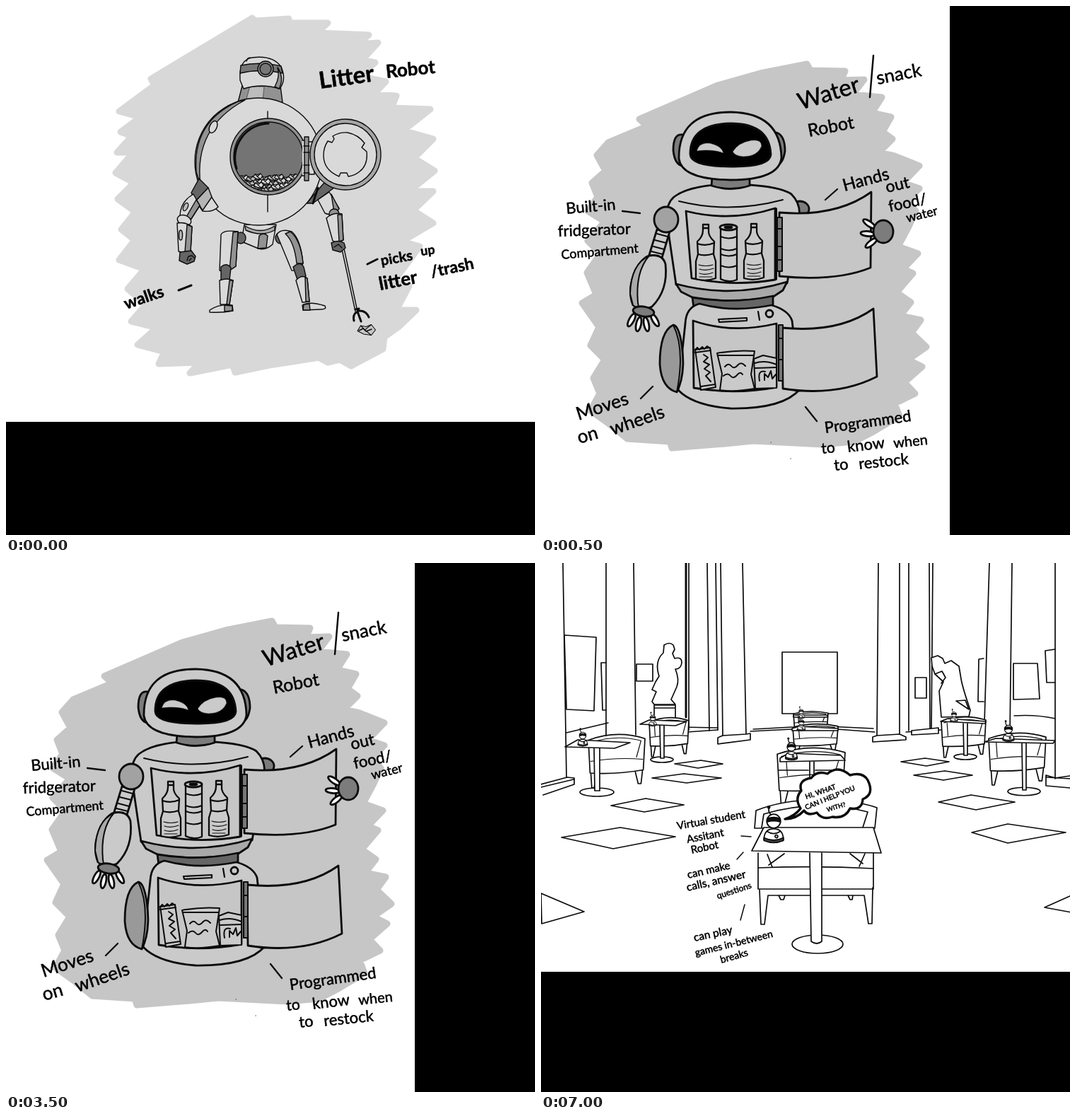
Write an HTML page that moves like this. It is 748 px wide and 748 px high and loops after 8 s.

```html
<!DOCTYPE html>
<html lang="en">
<head>
<meta charset="utf-8">
<title>Robot sketches</title>
<style>
html, body { margin: 0; width: 100%; height: 100%; overflow: hidden; background: #000; }
svg { display: block; width: 100vw; height: 100vh; }
.scene { stroke: #0b0b0b; stroke-linecap: round; stroke-linejoin: round; opacity: 0; }
.scene:first-child { opacity: 1; }
text { font-family: Lato, "Open Sans", sans-serif; fill: #000; stroke: #000; stroke-width: .5; }
</style>
</head>
<body>
<svg id="stage" viewBox="0 0 748 748"></svg>
<script>
const path = (d, fill = 'none', width) =>
  `<path d="${d}" fill="${fill}"${width ? ` stroke-width="${width}"` : ''}/>`;
const poly = (points, fill = 'none', width) => path(`M${points}Z`, fill, width);
const oval = (x, y, rx, ry = rx, fill = 'none', turn = 0) =>
  `<ellipse cx="${x}" cy="${y}" rx="${rx}" ry="${ry}" fill="${fill}" transform="rotate(${turn} ${x} ${y})"/>`;
const note = (x, y, size, turn, words) =>
  `<text transform="translate(${x} ${y}) rotate(${turn})" font-size="${size}">${words}</text>`;
const notes = rows => rows.map(row => note(...row)).join('');
const paper = (w, h) => `<rect width="${w}" height="${h}" fill="#fff" stroke="none"/>`;
const wash = (points, tone) =>
  `<path d="M${points}Z" fill="${tone}" stroke="${tone}" stroke-width="9"/>`;

const LIGHT = '#d9d9d9', MID = '#929292', DARK = '#656565';

function rock(x, y, size, tone) {
  return `<g transform="translate(${x} ${y}) scale(${size})" stroke-width="${1.1 / size}">` +
    path('M-8 1L-5-4L0-3L5-5L9 0L5 5L-2 4Z', tone) + path('M-5-4L-1 0L5 5M-1 0L5-5') + '</g>';
}

function rockPile() {
  const rows = [[336, 243, 8, 10], [345, 249, 6, 11], [345, 255, 5, 12], [360, 261, 3, 11]];
  return rows.map(([x, y, count, gap], row) =>
    Array.from({ length: count }, (_, i) =>
      rock(x + i * gap, y + Math.sin(i * 2.4 + row) * 2, .8, ['#ddd', '#bbb', '#cfcfcf'][(i + row) % 3])
    ).join('')).join('');
}

function litterScene() {
  const backdrop = wash('205 103L348 17L352 21L400 18L396 24L455 24L440 38L513 41L497 54L526 52' +
    'L504 76L522 80L500 99L537 107L520 125L552 127L545 144L600 146L562 176L604 188L577 215' +
    'L606 233L570 262L604 262L576 289L604 307L560 333L585 340L548 390L570 396L552 430' +
    'L580 430L556 453L535 468L533 485L488 509L472 500L455 504L442 497L405 503L372 508L324 518' +
    'L320 507L260 519L274 504L216 506L224 489L186 479L213 455L177 446L198 422L172 400L196 372' +
    'L160 359L182 331L163 316L183 291L158 273L181 250L155 236L180 207L157 207L178 184L162 178' +
    'L190 157L160 149L210 112', '#d8d8d8');

  const arms =
    path('M455 244L464 257L434 279L425 279Z', DARK) + path('M441 257L434 279', 'none', 3) +
    path('M441 274L457 263L471 286Q465 299 451 293Z', LIGHT) +
    path('M460 266L471 287L464 292Z', MID) + oval(464, 294, 7, 7, MID) +
    path('M453 300Q462 291 475 294L477 331Q469 336 462 332Z', LIGHT) +
    path('M469 295L475 295L477 331L471 333Z', MID) +
    path('M475 344L494 432M478 343L497 432') +
    path('M460 335Q470 330 478 335L480 342L473 348L462 345Z', DARK) +
    path('M464 341L470 337L475 342') +
    path('M494 429L499 428M496 433Q490 436 492 445M497 432L502 446M498 431Q509 430 513 440', 'none', 3) +
    rock(509, 458, 1.5, '#c7c7c7') + path('M499 459L505 456L509 460L517 457');

  const legs =
    path('M337 309H382L377 337Q367 346 357 343L333 333Z', LIGHT) +
    path('M338 311Q360 324 380 311V317Q361 327 339 317Z', '#aaa') +
    path('M356 343L358 325Q364 319 370 325L368 342Z', MID) +
    oval(332, 328, 7, 8, DARK) + oval(388, 328, 7, 8, DARK) +
    path('M304 323Q308 316 328 319L325 368Q314 377 302 374Z', LIGHT) +
    path('M321 320L328 319L325 368L316 374Z', MID) +
    path('M304 369Q312 362 318 370L316 388L304 388Z', DARK) +
    path('M302 388Q312 384 321 388L316 422H303Z', LIGHT) + path('M316 388H321L316 422H312Z', MID) +
    path('M288 430Q301 421 320 423L321 431Q306 434 288 433Z', LIGHT) + path('M309 423V432L320 431V424Z', MID) +
    path('M383 323Q389 314 404 319Q417 330 420 364Q413 375 404 374Z', LIGHT) +
    path('M402 319Q417 331 420 364L411 364Q408 334 395 322Z', MID) +
    path('M406 369Q416 360 421 369L424 382L412 387Z', DARK) +
    path('M410 388Q418 379 426 385L429 418L419 419Z', LIGHT) + path('M423 384L426 385L429 418H424Z', MID) +
    path('M419 423Q430 417 451 424Q454 429 445 429L420 430Z', LIGHT) + path('M421 422L429 421L430 430L420 430Z', MID);

  const body =
    path('M334 113H388L391 136H328Z', MID) + path('M345 114H365L363 133H340Z', '#bcbcbc', .5) +
    oval(357, 220, 90, 90, LIGHT) +
    path('M328 135Q263 164 269 235L275 253Q265 172 338 133Z', MID) +
    oval(293, 171, 5, 9, LIGHT, 25) +
    path('M370 149V160M370 266V291') +
    oval(371, 213, 54, 54, MID) + oval(371, 213, 49, 49, '#747474') +
    path('M326 230A49 49 0 0 1 371 166', 'none', 3) +
    `<g clip-path="url(#hatch)">${rockPile()}</g>` +
    path('M419 190H427V240H419M427 192H436V238H427', LIGHT) +
    path('M422 185H428V247H422ZM421 198H429M421 207H429M421 225H429M421 236H429', MID) +
    oval(480, 210, 50, 50, '#a5a5a5') + oval(480, 210, 44, 44, LIGHT) +
    path('M462 184Q472 178 483 179Q498 182 507 194L503 200L510 206Q512 225 500 234' +
      'Q493 240 484 241L482 236H473L471 241Q449 232 449 211Q449 200 455 191L461 193L464 188Z');

  const head =
    path('M331 105Q329 76 348 73Q377 69 389 86Q397 104 387 117Q361 109 336 117Z', LIGHT) +
    path('M332 84Q360 78 389 85L391 95Q360 88 331 95Z', '#777') +
    oval(367, 89, 11, 11, MID) + oval(367, 89, 8, 8, '#777') +
    path('M340 78L342 74L345 73') + path('M384 87Q394 102 386 117L380 114Q388 100 384 87', MID);

  const leftArm =
    path('M273 244L300 284Q293 292 278 290L263 267Z', LIGHT) +
    path('M273 244L286 257L269 275L262 264Z', DARK) + path('M286 257L291 270L278 289L269 275Z', '#b5b5b5') +
    path('M265 266L274 282L260 304L246 296Q247 276 265 266Z', LIGHT) +
    path('M269 274L274 282L260 304L254 300Z', MID) + oval(254, 284, 3, 6, '#bbb', 25) +
    oval(252, 303, 10, 7, LIGHT, 20) +
    path('M242 307Q254 305 263 312L261 347Q252 350 244 347Z', LIGHT) +
    path('M256 309L263 312L261 347L253 348Z', MID) + oval(247, 324, 2.5, 7, '#bbb') +
    path('M246 348L262 346L268 354L266 361L256 365L245 360Z', DARK) +
    path('M256 360L258 354L263 353L267 357M259 360L262 357');

  return paper(748, 588) + backdrop +
    '<clipPath id="hatch"><circle cx="371" cy="213" r="48"/></clipPath>' +
    `<g stroke-width="1.4">${arms + legs + body + head + leftArm}</g>` +
    path('M244 402L262 395M511 365L525 358', 'none', 3) +
    '<g style="font-weight:bold">' + notes([
      [444, 117, 33, -8, 'Litter'], [538, 102, 26, -6, 'Robot'],
      [170, 429, 23, -19, 'walks'],
      [531, 367, 20, -10, 'picks'], [587, 353, 18, -8, 'up'],
      [529, 402, 26, -11, 'litter'], [602, 384, 23, -12, '/trash']
    ]) + '</g>';
}

function bottle(x, y) {
  return `<g transform="translate(${x} ${y})" stroke-width="2.3">` +
    path('M-4 0H4V8Q3 16 12 24L11 42L14 52V76Q0 81-14 77V52L-11 42L-12 24Q-4 17-4 8Z', '#cacaca') +
    path('M-4 5H4M-12 27Q0 31 12 26M-11 42Q0 45 11 41') +
    path('M-10 57Q0 60 10 57M-9 63Q0 66 11 62M-9 69Q0 72 10 68M-9 74H9', 'none', 1.2) + '</g>';
}

function snackScene() {
  const SKIN = '#cacaca', SHADE = '#7c7c7c', GREY = '#c6c6c6';
  const backdrop = wash('139 160L250 112L310 95L376 82L381 91L430 92L424 105L457 104L441 125L482 129L468 151' +
    'L495 157L483 178L497 188L478 207L500 212L535 226L512 250L535 258L518 275L530 290L520 312L505 340' +
    'L533 350L512 372L526 378L503 405L523 419L508 438L537 444L524 462L545 482L519 500' +
    'L539 510L514 532L529 548L500 562L507 580L470 602L443 616L398 620L300 615L260 619' +
    'L185 625L182 616L122 612L95 590L70 572L83 548L74 526L90 500L70 480L82 454L58 420L78 408' +
    'L65 377L84 350L66 332L90 305L66 290L80 270L72 250L91 233L79 211L95 193L150 170', GREY);

  const torso =
    oval(366, 287, 13, 11, SHADE) +
    path('M188 270Q210 253 267 252Q335 253 354 266Q368 280 365 300L348 392Q270 416 191 394L178 305Q176 280 188 270Z', SKIN) +
    path('M195 276Q267 294 342 274', 'none', 2) +
    path('M191 393Q270 414 348 390L342 402L327 412Q270 421 216 413L198 404Z', '#a9a9a9') +
    path('M214 412Q270 422 328 410V425Q270 436 216 427Z', '#666') +
    path('M205 290Q268 306 331 286V387Q272 397 213 385Z', GREY) +
    path('M332 287V386', 'none', 4);

  const pantry =
    bottle(233, 309) + bottle(301, 308) +
    path('M254 312V386Q265 392 277 387V312', SKIN, 2.3) + oval(265, 313, 12, 4, SKIN) + oval(265, 313, 5, 1, '#111') +
    path('M254 326Q265 331 277 326M254 343Q265 348 277 343M254 351Q265 356 277 351M254 367Q265 372 277 367', 'none', 2);

  const base =
    path('M204 449Q205 426 224 421Q270 434 326 423Q350 430 355 445L366 542Q342 570 268 569Q215 565 194 543Z', SKIN) +
    oval(364, 537, 11, 7, SHADE) +
    path('M251 443L291 441V445L252 447ZM307 432L309 444', 'none', 2.2) + oval(323, 435, 5) +
    path('M215 445Q270 464 333 449V539Q275 550 216 540Z', GREY) +
    path('M187 451Q168 460 168 506Q170 540 192 546Q205 520 199 479Q195 452 187 451Z', '#999') +
    path('M187 451Q204 485 192 546', 'none', 2) +
    `<g stroke-width="2">${[
      path('M218 486L239 483L247 539L226 543Z', SKIN) + path('M218 490L240 487M226 538L246 535'),
      path('M218 486L221 483L224 486L228 482L231 485L235 481L239 484'),
      path('M230 493L236 497L230 503L238 507L231 513L239 518L233 523L240 531'),
      path('M301 499L314 494L333 498V540L303 541Z', SKIN) + path('M302 505Q317 500 333 507M303 512L333 511'),
      path('M317 517Q306 514 309 530M316 529V520L321 525L325 516L327 527L332 521'),
      path('M249 491Q276 486 302 488L297 521L302 541Q274 546 253 543L256 520Z', SKIN),
      path('M251 494H300M260 510Q265 504 269 509T278 508T289 509M258 523Q264 518 268 523T277 522T285 521')
    ].join('')}</g>`;

  const doors =
    path('M337 292Q417 299 467 263L466 370Q417 390 337 382Z', GREY) +
    path('M341 455Q421 463 470 428L475 524Q418 553 342 541Z', GREY) +
    path('M334 299H341V375H334ZM334 315H341M334 340H341M334 359H341M336 451H342V530H336ZM336 470H342M336 500H342', '#777', 2);

  const finger = (x, y, turn) => oval(x, y, 3.5, 10, '#fff', turn);
  const hands =
    finger(464, 308, -55) + finger(462, 322, -85) + finger(467, 335, 52) + oval(484, 319, 14, 16, SHADE) +
    path('M164 316L182 319L171 356L153 352Z', SKIN) +
    path('M164 322L179 326M161 331L177 335M159 340L174 344M156 347L172 351', 'none', 2) +
    oval(177, 302, 17, 18, '#a2a2a2') +
    path('M153 353Q172 350 176 365Q180 402 157 425Q143 433 130 423Q121 400 134 373Q144 355 153 353Z', SKIN) +
    path('M153 353Q127 365 126 407L130 423Q140 430 137 420Q133 376 153 353Z', '#aaa', 2) +
    finger(128, 444, 28) + finger(138, 450, 12) + finger(149, 450, -12) + finger(161, 444, -30) +
    oval(145, 432, 15, 7, SHADE, 8);

  const head =
    path('M242 242H295V254Q268 263 241 254Z', SHADE) +
    path('M200 182Q187 180 187 204Q189 225 201 226M333 179Q345 183 345 205Q342 225 331 226', SHADE) +
    path('M195 216Q194 150 268 150Q339 151 340 215Q336 246 268 246Q199 245 195 216Z', SKIN) +
    path('M211 210Q210 167 268 166Q323 166 325 210Q324 228 268 227Q212 227 211 210Z', '#000') +
    path('M220 205Q224 192 239 194Q256 198 258 208Q242 202 220 205ZM271 206Q279 193 297 190Q312 188 312 198Q306 213 286 213Q274 212 271 206Z', SKIN, .5);

  return paper(578, 748) + backdrop +
    `<g stroke-width="2.8">${torso + pantry + base + doors + hands + head}</g>` +
    path('M470 70L465 129', 'none', 2.5) +
    path('M402 274L419 259M115 290L140 293M141 555L158 538M374 567L390 587', 'none', 2.3) +
    path('M353 640h.2M325 617h.2', 'none', 1.2) +
    notes([
      [367, 147, 33, -17, 'Water'], [476, 111, 26, -11, 'snack'], [379, 185, 25, -11, 'Robot'],
      [429, 262, 24, -15, 'Hands'], [489, 264, 23, -13, 'out'],
      [493, 291, 22, -12, 'food/'], [518, 306, 18, -14, 'water'],
      [36, 294, 22, -5, 'Built-in'], [24, 326, 22, -2, 'fridgerator'], [29, 358, 18, -5, 'Compartment'],
      [53, 586, 26, -18, 'Moves'], [54, 619, 26, -16, 'on'], [101, 607, 26, -19, 'wheels'],
      [402, 604, 22, -8, 'Programmed'],
      [397, 633, 21, -6, 'to'], [434, 631, 22, -7, 'know'], [499, 625, 20, -6, 'when'],
      [415, 657, 22, -6, 'to'], [450, 655, 22, -6, 'restock']
    ]);
}

function deskBot(x, y, size) {
  return `<g transform="translate(${x} ${y}) scale(${size})" stroke-width="${size < .8 ? 2.2 : 1.8}">` +
    path('M-14 27Q-14 11 0 11Q14 11 14 27Q0 34-14 27Z', '#fff') +
    path('M-14 24Q0 31 14 24V28Q0 34-14 28Z', '#444') + path('M-9 15Q0 21 9 15') + oval(4, 22, 2) +
    oval(0, 0, 10, 10, '#fff') + path('M-9-4Q0-7 9-4V1Q0-2-9 1Z', '#111') +
    path('M-4-9L-7-14V-19') + oval(-7, -20, 1.5, 1.5, '#111') + '</g>';
}

function chair(x, y, w, h) {
  return `<g transform="translate(${x} ${y})">` +
    path(`M${.04 * w} ${.66 * h}L${.06 * w} ${h}H${.1 * w}L${.16 * w} ${.72 * h}` +
      `M${.83 * w} ${.7 * h}L${.88 * w} ${.92 * h}H${.93 * w}L${.96 * w} ${.64 * h}`, '#fff') +
    path(`M0 ${.1 * h}Q${.5 * w} ${-.1 * h} ${w} ${.07 * h}L${.97 * w} ${.66 * h}Q${.5 * w} ${.75 * h} ${.03 * w} ${.72 * h}Z`, '#fff') +
    path(`M${.06 * w} ${.14 * h}Q${.5 * w} ${-.01 * h} ${.93 * w} ${.11 * h}L${.85 * w} ${.42 * h}` +
      `M${.04 * w} ${.5 * h}Q${.5 * w} ${.42 * h} ${.96 * w} ${.46 * h}M${.15 * w} ${.46 * h}L${.13 * w} ${.15 * h}`, 'none', 1.2) + '</g>';
}

function table(top, x, y, foot, half, base) {
  return oval(x, foot, base, base / 4, '#fff') +
    path(`M${x - half} ${y}L${x - half + 1} ${foot - 2}H${x + half}V${y}`, '#fff') + poly(top, '#fff');
}

function hallScene() {
  const columns =
    path('M31 0L36 303M92 0V246M131 0L134 243M209 0V236M235 0L238 237M247 0L250 236M254 0L257 246M285 0L290 243') +
    path('M477 0L475 244M507 0V243M520 0V237M549 0L550 237M554 0L552 235M634 0L627 225M666 0L663 242M727 0V305') +
    path('M205 0V218', 'none', 3) +
    path('M192 240L250 236M296 238L355 235M405 234L472 239M516 239L566 236M669 216Q700 214 727 220M36 240L95 226M196 232L250 233M300 235L355 232M405 231L470 234', 'none', 1.4) +
    poly('250 247L257 244L290 242L296 241V250L250 256', '#fff') +
    poly('469 246L475 244L507 242L516 246V250L469 253', '#fff') +
    path('M524 237L562 233V241L524 243Z', '#fff') +
    path('M0 313L37 303L47 304V313L3 328M0 317L46 306M748 301L727 304L714 300V315L748 318M748 305L715 303');

  const pictures = [
    '341 126H419V213H341', '33 102L78 105L75 209L36 207', '135 143H158V167H135',
    '529 162H545V191H529', '668 142H702L705 192L668 193'
  ].map(points => poly(points)).join('') +
    path('M92 141H85L87 208H92M626 135L619 136L618 196H626M727 122L713 124L715 169H727');

  const sculptures =
    path('M160 201H190V222H160ZM160 205H190', '#fff') +
    poly('174 116Q182 111 187 116L189 122L186 128L189 135Q199 132 199 141Q198 150 190 150' +
      'Q196 165 192 175L184 193L190 200H160L157 196L163 182L157 179L162 168L167 160Q160 139 173 127Z', '#fff') +
    poly('552 134L561 131L568 135L571 142L580 138L591 146L594 164Q596 176 607 208L605 217L566 218' +
      'L563 181L569 168L557 157L553 146', '#fff') +
    path('M557 157L567 153L572 162L566 170M587 195L600 194L605 207Z');

  const tiles = [
    '189 284L226 279L257 284L222 290', '157 304L202 298L255 304L206 311',
    '99 343L148 333L202 342L146 352', '29 388L112 374L190 387L102 404', '0 467L61 493L1 510',
    '509 281L543 276L577 281L545 287', '527 300L571 294L610 300L569 307',
    '562 338L608 328L670 338L615 349', '609 381L660 369L742 381L660 396', '750 470L712 487L750 494'
  ].map(points => poly(points, '#fff')).join('');

  const seating =
    chair(153, 219, 56, 55) + table('140 228L153 222L206 224L190 230', 171, 229, 278, 3, 16) +
    chair(67, 243, 80, 75) + table('34 260L52 250L126 254L104 262', 79, 262, 324, 4, 24) +
    chair(566, 218, 63, 57) + table('565 224L575 220L629 224L628 227', 600, 227, 274, 3, 16) +
    chair(633, 241, 81, 73) + table('627 253L643 248L727 251L724 255', 683, 255, 323, 3, 23) +
    chair(357, 210, 49, 32) + poly('357 215H405V218H357', '#fff') +
    chair(356, 228, 64, 42) + poly('355 234L365 231L420 234V237H355', '#fff') +
    chair(334, 262, 96, 83) + poly('338 276L350 269L424 272L430 279L338 281', '#fff') +
    path('M380 281V330H386V281M336 293H378M388 293H425') +
    [[59, 244, .48], [158, 219, .38], [368, 210, .32], [368, 225, .4], [354, 260, .6],
     [584, 214, .35], [661, 235, .56]].map(bot => deskBot(...bot)).join('');

  const front =
    path('M302 375L304 350Q342 335 390 335Q445 335 475 346L472 375Z', '#fff') +
    path('M312 374L315 355Q390 333 462 352L455 374') +
    path('M307 410V461H470V410', '#fff') +
    path('M307 431Q390 428 470 432M320 412L327 430M344 411L322 427M458 411L450 429M437 411L455 425') +
    path('M309 462L311 511H316L321 470H457L463 510H468L469 459M336 470L339 476H343L345 470M434 470L437 476H440L441 470') +
    oval(391, 539, 36, 13, '#fff') +
    path('M380 410L382 535Q390 541 397 535V410', '#fff') +
    poly('315 374H470L481 410L298 407', '#fff') + deskBot(329, 365, .98);

  const bubble = path('M345 362Q360 357 367 347Q358 333 368 322Q363 307 382 304Q390 293 405 298' +
    'Q420 285 437 300Q455 295 462 307Q472 327 455 334Q454 350 437 347Q430 362 412 359' +
    'Q398 364 390 353Q377 358 372 350Q361 362 345 362Z', '#fff', 3.4);

  return paper(748, 578) +
    `<g stroke-width="1.7">${columns + pictures + sculptures + tiles + seating + front + bubble}</g>` +
    path('M283 386L297 387M277 419L286 409M282 505L288 483', 'none', 1.5) +
    '<g style="stroke-width:.2">' + notes([
      [193, 377, 15, -10, 'Virtual student'], [207, 396, 15, -11, 'Assitant'], [213, 411, 15, -12, 'Robot'],
      [208, 446, 15, -13, 'can make'], [207, 464, 15.5, -13, 'calls, answer'], [250, 475, 12, -18, 'questions'],
      [217, 535, 15.5, -12, 'can play'], [219, 556, 14, -14, 'games in-between'], [255, 566, 14, -16, 'breaks'],
      [375, 334, 10, -19, 'HI, WHAT'], [375, 349, 9.8, -22, 'CAN I HELP YOU'], [405, 352, 8.8, -17, 'WITH?']
    ]) + '</g>';
}

const LOOP = 8000;
const timeline = [
  { draw: litterScene, start: 0 },
  { draw: snackScene, start: 500 },
  { draw: hallScene, start: 5500 }
];

const stage = document.getElementById('stage');
stage.innerHTML = timeline.map(({ draw }) => `<g class="scene">${draw()}</g>`).join('');
timeline.forEach((scene, i) => {
  const steps = timeline.map(other => ({
    offset: other.start / LOOP, opacity: other === scene ? 1 : 0, easing: 'step-end'
  }));
  stage.children[i].animate([...steps, { ...steps.at(-1), offset: 1 }],
    { duration: LOOP, iterations: Infinity });
});
</script>
</body>
</html>
```
